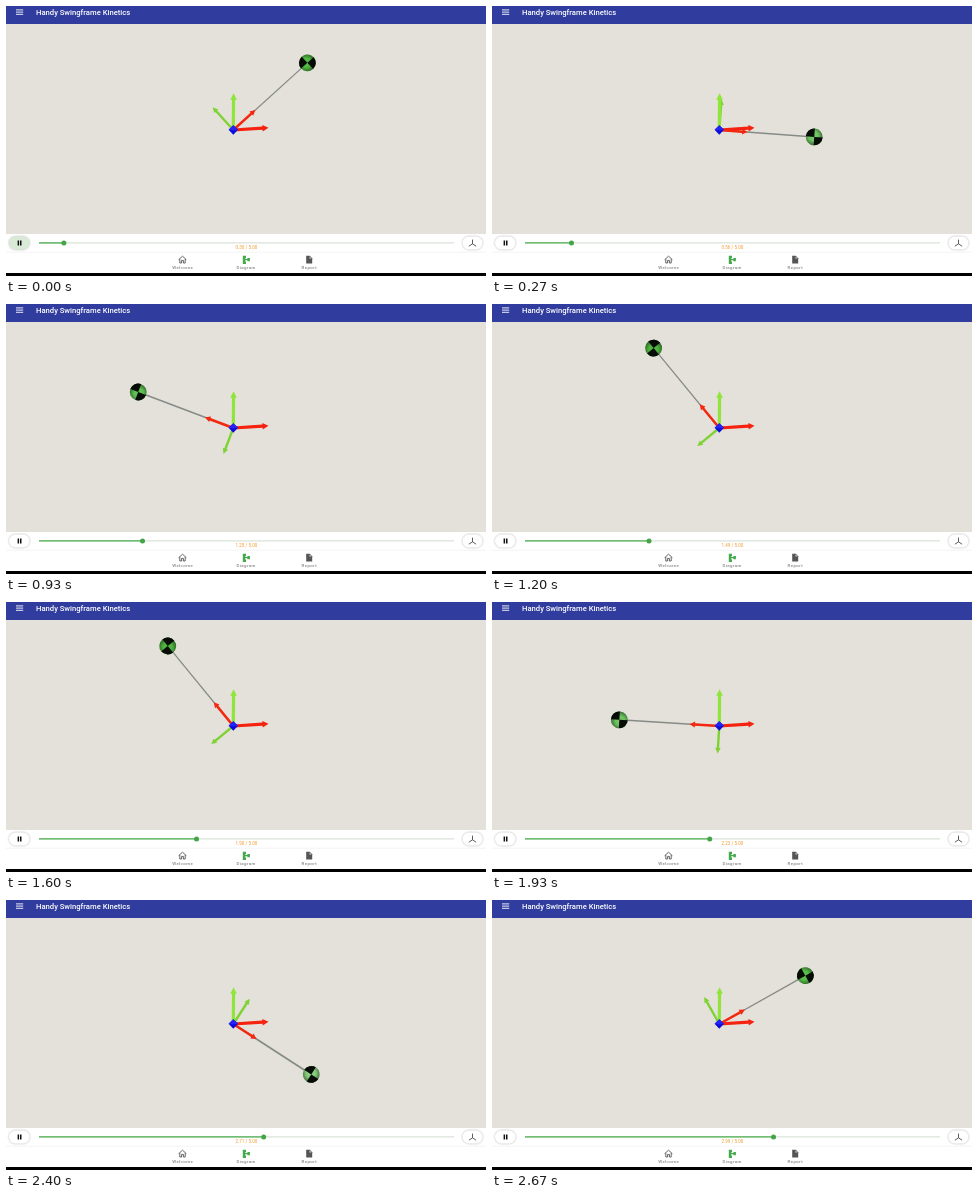
Write an HTML page that moves like this. It is 480x270 px and loops after 2.74 s.

```html
<!DOCTYPE html>
<html lang="en">
<head>
<meta charset="utf-8">
<title>Pendulum</title>
<style>
  html, body { margin: 0; width: 100%; height: 100%; overflow: hidden; background: #e4e0da; }
  svg { display: block; width: 480px; height: 270px; font-family: Roboto, sans-serif; }
  .title { font-size: 7.65px; font-weight: 500; fill: #fff; }
  .nav { font-size: 4.4px; letter-spacing: .4px; fill: #666; text-anchor: middle; }
  .clock { font-size: 4.5px; fill: #f29a2e; text-anchor: middle; }
  .pill { filter: drop-shadow(0 .7px .8px rgba(0, 0, 0, .3)); }
</style>
</head>
<body>
<svg viewBox="0 0 480 270">
  <defs>
    <radialGradient id="shade" cx=".45" cy=".45" r=".58">
      <stop offset=".45" stop-color="#000" stop-opacity="0"/>
      <stop offset="1" stop-color="#000" stop-opacity=".5"/>
    </radialGradient>
  </defs>
  <rect width="480" height="270" fill="#e4e0da"/>

  <g id="scene">
    <line id="rod" x1="227.3" y1="124" stroke="#858b87"/>
    <path id="bodyY" fill="#7ed332"/>
    <path id="fixedX" fill="#f4220f"/>
    <path id="fixedY" fill="#90e53a"/>
    <path id="bodyX" fill="#f4280f"/>
    <path d="M227.3 119.2L232 123.8L227.3 128.7L222.6 123.8Z" fill="#0c0cd8"/>
    <path d="M227.3 119.2L232 123.8L227.3 124.6L222.6 123.8Z" fill="#2424f4"/>
    <g id="ball">
      <circle id="skin" r="8.4"/>
      <path d="M0 0H8.4A8.4 8.4 0 0 1 0 8.4ZM0 0H-8.4A8.4 8.4 0 0 1 0 -8.4Z" fill="#090d09"/>
      <circle r="8.4" fill="url(#shade)"/>
    </g>
  </g>

  <rect width="480" height="18" fill="#303c9e"/>
  <path d="M10 3.9h7.2M10 6.1h7.2M10 8.3h7.2" stroke="#fff" stroke-width=".9"/>
  <text class="title" x="30" y="8.7">Handy Swingframe Kinetics</text>

  <rect y="228" width="480" height="39" fill="#fff"/>
  <rect y="267" width="480" height="3" fill="#000"/>
  <path d="M0 246.2H480" stroke="#ececec" stroke-width=".6"/>

  <rect class="pill" id="pause" x="3" y="230.5" width="20.5" height="13" rx="6.5"/>
  <path d="M11.6 234.6h1.5v5h-1.5zM14 234.6h1.5v5H14z" fill="#111"/>
  <rect class="pill" x="456.5" y="230.5" width="20" height="13" rx="6.5" fill="#fff"/>
  <path d="M466.5 233.6v4.2l-3.6 2.4M466.5 237.8l3.6 2.4" fill="none" stroke="#333" stroke-width=".8"/>

  <path d="M33 236.9H448" stroke="#cfdccf" stroke-width="1"/>
  <path id="fill" stroke="#4caf50" stroke-width="1.3"/>
  <circle id="knob" r="2.5" cy="236.9" fill="#43a548"/>
  <text class="clock" id="clock" x="240.4" y="243.3"></text>

  <path d="M172.6 253.7L176.5 250.2L180.4 253.7M173.8 253V257H175.6V254.4H177.4V257H179.2V253" fill="none" stroke="#555" stroke-width=".9"/>
  <path d="M236.8 249.8h3.2v2.4h-.8v.9h2.2v-1h2.5v3.2h-2.5v-1h-2.2v1.2h.8v2.5h-3.2z" fill="#45aa4c"/>
  <path d="M300.2 249.8h3.6l2.4 2.4v5.2h-6z" fill="#555"/>
  <path d="M303.5 250.4v2.1h2.1z" fill="#ddd"/>
  <text class="nav" x="176.7" y="263.2">Welcome</text>
  <text class="nav" x="240.2" y="263.2">Diagram</text>
  <text class="nav" x="303.3" y="263.2">Report</text>
</svg>
<script>
const LOOP = 2740, STEP = 200 / 3;
const PIVOT = { x: 227.3, y: 124 };
const RAD = Math.PI / 180;
const $ = id => document.getElementById(id);
const set = (id, attrs) => {
  for (const key in attrs) $(id).setAttribute(key, attrs[key]);
};

// [ms, pendulum seconds, displayed seconds]
const timing = [
  [0, .30, .30], [470, .773, .753], [930, 1.247, 1.247], [1200, 1.50, 1.494],
  [1600, 1.90, 1.898], [2200, 2.519, 2.494], [2670, 3.0, 2.994]
];

function lookup(ms, col) {
  let i = 1;
  while (i < timing.length - 1 && timing[i][0] < ms) i++;
  const a = timing[i - 1], b = timing[i];
  return a[col] + (b[col] - a[col]) * (ms - a[0]) / (b[0] - a[0]);
}

// Large-angle pendulum released from rest, measured from straight down
const DT = .001, swing = [];
for (let i = 0, angle = 147 * RAD, speed = 0; i < 3200; i++) {
  swing.push(angle);
  speed -= 9.93 * Math.sin(angle) * DT * (i ? 1 : .5);
  angle += speed * DT;
}

// Rod length on screen varies a little with perspective
function reach(angle, scale = 1) {
  const s = Math.sin(angle), c = Math.cos(angle);
  const r = (97.7 - 5.7 * c - 2.1 * s) * scale;
  return { x: PIVOT.x + r * s, y: PIVOT.y + r * c };
}

function arrow(id, tip, shaft, head, len) {
  const dx = tip.x - PIVOT.x, dy = tip.y - PIVOT.y, d = Math.hypot(dx, dy);
  const at = (along, side) =>
    (PIVOT.x + (dx * along - dy * side) / d).toFixed(2) + ' ' +
    (PIVOT.y + (dy * along + dx * side) / d).toFixed(2);
  const neck = d - len;
  const points = [at(0, shaft), at(neck, shaft), at(neck, head), at(d, 0),
    at(neck, -head), at(neck, -shaft), at(0, -shaft)];
  set(id, { d: 'M' + points.join('L') + 'Z' });
}

function draw(time) {
  let k = Math.round(time / STEP);
  if (Math.round(k * STEP / 10) * 10 > time) k--;
  k = Math.max(0, Math.min(40, k));
  const ms = Math.round(k * STEP / 10) * 10;

  const angle = swing[Math.round(lookup(ms, 1) / DT)];
  const low = Math.cos(angle);
  const end = reach(angle);
  set('rod', { x2: end.x, y2: end.y, 'stroke-width': 1.5 + .35 * low });
  arrow('bodyX', reach(angle, .298), 1.25, 2.9, 5.5);
  arrow('bodyY', reach(angle + Math.PI / 2, .298), 1.2, 2.7, 5.5);
  set('ball', { transform: `translate(${end.x} ${end.y}) rotate(${90 - angle / RAD})` });
  set('skin', { fill: `hsl(112 ${46 - 2 * low}% ${58 + 13 * low}%)` });

  const shown = lookup(ms, 2), x = 33 + 83 * shown;
  set('fill', { d: `M33 236.9H${x}` });
  set('knob', { cx: x });
  $('clock').textContent = shown.toFixed(2) + ' / 5.00';

  const fade = Math.min(1, k / 4);
  set('pause', { fill: `rgb(${217 + 38 * fade} ${234 + 21 * fade} ${215 + 40 * fade})` });
}

arrow('fixedX', { x: 262.5, y: 121.8 }, 1.6, 3.3, 6);
arrow('fixedY', { x: 227.6, y: 87.2 }, 1.6, 3.3, 6.5);

const start = performance.now();
function tick() {
  draw((performance.now() - start) % LOOP);
  requestAnimationFrame(tick);
}
tick();
</script>
</body>
</html>
```
